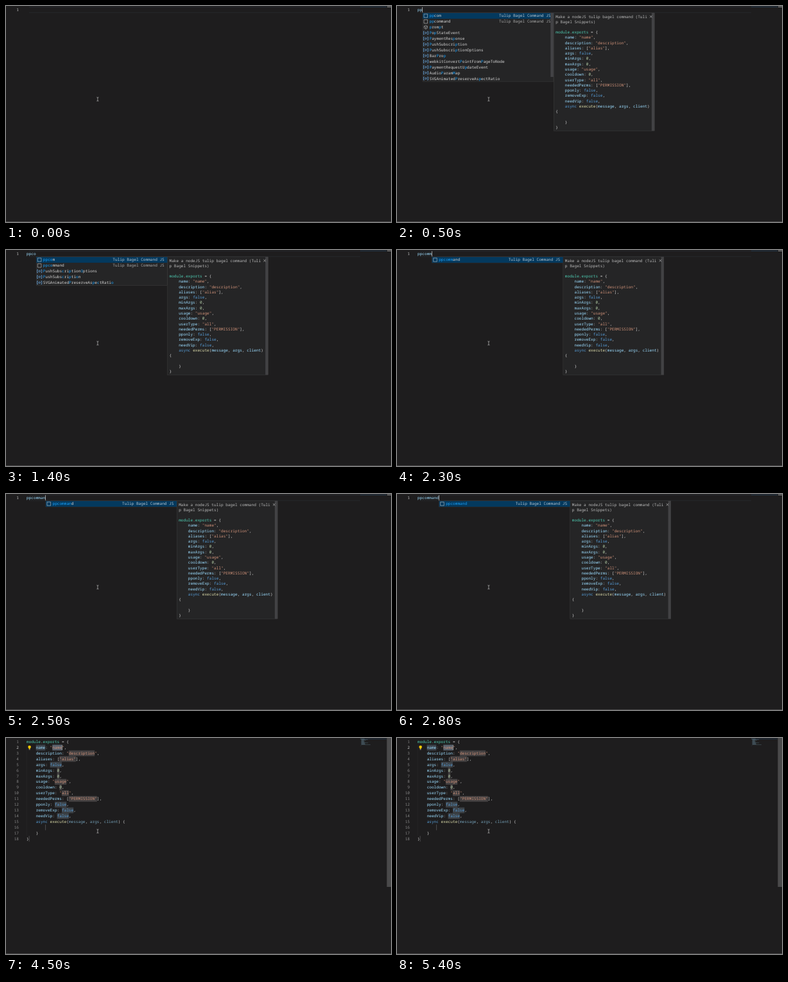
Recreate the animation shown at these times as an HTML page. Size 600 by 338 pixels, loop 5.6 s.

```html
<!DOCTYPE html>
<html lang="en">
<head>
<meta charset="utf-8">
<title>Snippet completion</title>
<style>
  html, body { margin: 0; width: 100%; height: 100%; overflow: hidden; background: #1e1d1e; }
  svg { display: block; width: 600px; height: 338px; }
  text {
    font: 6.1px "Noto Sans Mono", "DejaVu Sans Mono", monospace;
    white-space: pre;
    text-rendering: geometricPrecision;
  }
</style>
</head>
<body>
<svg id="stage" viewBox="0 0 600 338"></svg>
<script>
const LOOP = 5600, INSERT = 3200, BULB = 3400, DIM = 4200;
const CHAR = 3.66, LEFT = 32, LINE = 8.92, DOC_LINE = 8.28;
const stage = document.getElementById('stage');

// Start time of each typed prefix
const typing = [
  [0, ''], [200, 'p'], [400, 'pp'], [600, 'ppc'], [700, 'ppco'], [1900, 'ppcom'],
  [2100, 'ppcomm'], [2400, 'ppcomma'], [2500, 'ppcomman'], [2600, 'ppcommand']
];

// Angle brackets mark the tab stops
const snippet = `module.exports = {
    name: "<name>",
    description: "<description>",
    aliases: [<"alias">],
    args: <false>,
    minArgs: <0>,
    maxArgs: <0>,
    usage: "<usage>",
    cooldown: <0>,
    userType: "<all>",
    neededPerms: [<"PERMISSION">],
    pponly: <false>,
    removeExp: <false>,
    needVip: <false>,
    async execute(message, args, client) {
        <>
    }
}<>`;
const docLines = snippet.replace(/[<>]/g, '').replace(') {', ')\n{').split('\n');
const docIntro = ['Make a nodeJS tulip bagel command (Tuli', 'p Bagel Snippets)'];
const label = 'Tulip Bagel Command JS';

// Underscores toggle the matched letters
const broadMatches = [
  '_p_rom_p_t', '_P_o_p_StateEvent', '_P_aymentRes_p_onse', '_P_ushSubscri_p_tion',
  '_P_ushSubscri_p_tionOptions', 'Bar_P_ro_p_', 'webkitConvert_P_ointFrom_P_ageToNode',
  '_P_aymentRequestU_p_dateEvent', 'Audio_P_aram_M_ap', 'SVGAnimated_P_reserveAs_p_ectRatio'
];
const narrowMatches = [
  '_P_ushSubs_c_ri_p_tion_O_ptions', '_P_ushSubs_c_ri_p_ti_o_n', 'SVGAnimated_P_reserveAs_p_e_c_tRati_o_'
];

const esc = s => s.replace(/&/g, '&amp;').replace(/</g, '&lt;');
const rect = (x, y, w, h, fill, extra = '') =>
  `<rect x="${x}" y="${y}" width="${w}" height="${h}" fill="${fill}" ${extra}/>`;
const path = (d, stroke, width = .6, fill = 'none') =>
  `<path d="${d}" stroke="${stroke}" stroke-width="${width}" fill="${fill}"/>`;
const text = (x, y, s, fill, extra = '') =>
  `<text x="${x}" y="${y + 2}" fill="${fill}" ${extra}>${esc(s)}</text>`;
const lineY = n => 6 + n * LINE;

function tokenColor(token) {
  if (token[0] === '"') return '#ce9178';
  if (/^(async|false)$/.test(token)) return '#569cd6';
  if (/^(module|exports)$/.test(token)) return '#4ec9b0';
  if (token === 'execute') return '#dcdcaa';
  if (/^\d/.test(token)) return '#b5cea8';
  return /^\w/.test(token) ? '#9cdcfe' : '#d4d4d4';
}

function code(x, y, line, dim) {
  return [...line.matchAll(/"[^"]*"|\w+|[^\w\s"]+/g)].map(({0: token, index}) => {
    const faded = dim && /^(message|args|client)$/.test(token) && line.includes('execute');
    return text(x + index * CHAR, y, token, tokenColor(token), faded ? 'opacity=".67"' : '');
  }).join('');
}

function marked(x, y, source) {
  let col = 0;
  return source.split('_').map((part, i) => {
    const out = part && text(x + col * CHAR, y, part, i % 2 ? '#18a0fb' : '#d4d4d4');
    col += part.length;
    return out;
  }).join('');
}

function icon(x, y, kind) {
  if (kind === 'snippet')
    return path(`M${x + 2} ${y - 2.8}h5.6v5.6h-5.6z`, '#c5c5c5');
  if (kind === 'method')
    return path(`M${x + 4.8} ${y - 3}l2.6 1.4v3l-2.6 1.5l-2.6 -1.5v-3zm-2.6 1.5l2.6 1.4l2.6 -1.4m-2.6 1.4v2.9`, '#c5c5c5', .55);
  return path(`M${x + 2.6} ${y - 2.4}h-1.2v4.8h1.2M${x + 7.2} ${y - 2.4}h1.2v4.8h-1.2` +
    `M${x + 3.2} ${y}l1.7 -1.4l1.7 1.2l-1.7 1.6z`, '#75beff', .7);
}

function suggestions(typed, caretX) {
  const names = ['ppcom', 'ppcommand'].filter(name => name.startsWith(typed))
    .map(name => `_${typed}_${name.slice(typed.length)}`);
  const own = names.length;
  if (typed.length === 2) names.push(...broadMatches);
  else if (typed.length < 5) names.push(...narrowMatches);

  const x = caretX + .7, height = names.length * LINE + .3;
  let out = rect(x, 10.8, 204, height, '#252526', 'stroke="#454545" stroke-width=".4"');
  out += rect(x, 11, 204, LINE, '#04395e');
  if (names.length > 10) out += rect(x + 199.3, 11, 4.5, 100, '#434346');
  names.forEach((name, i) => {
    const y = 15.4 + i * LINE;
    const kind = i < own ? 'snippet' : name === '_p_rom_p_t' ? 'method' : 'variable';
    out += icon(x, y, kind) + marked(x + 10.5, y, name);
    if (i < own) out += text(x + 119, y, label, i ? '#a5a5a5' : '#b4c4d0');
  });
  return out;
}

function docPanel(x) {
  let out = rect(x, 10.8, 157, 184.6, '#252526', 'stroke="#454545" stroke-width=".4"');
  out += rect(x + 152.7, 11, 4.3, 184.2, '#424244');
  docIntro.forEach((line, i) => out += text(x + 3, 16.8 + i * DOC_LINE, line, '#b8b8b8'));
  docLines.forEach((line, i) => out += code(x + 3, 41 + i * DOC_LINE, line));
  return out + path(`M${x + 149.8} 14.8l3.6 3.6m0 -3.6l-3.6 3.6`, '#d0d0d0');
}

function typingView({typed, caret}) {
  const caretX = LEFT + typed.length * CHAR;
  let out = path('M36 1.7H552M36 10.3H552', '#2b3136', .6);
  out += rect(552, 1, 41, 1, '#24384a') + rect(594, .8, 6, 1.2, '#8a8a8a');
  out += text(20 - CHAR, 6, '1', '#c6c6c6') + text(LEFT, 6, typed, '#9cdcfe');
  if (caret) out += rect(caretX, 1.8, .7, 8.2, '#d0d0d0');
  if (typed.length > 1) out += docPanel(caretX + 204.9) + suggestions(typed, caretX);
  return out;
}

function minimap() {
  let out = rect(552, 1, 41, .8, '#24384a');
  snippet.replace(/[<>]/g, '').split('\n').forEach((line, i) => {
    const indent = line.search(/\S/);
    if (indent >= 0)
      out += rect(552 + indent * .4, 1 + i * .66, (line.length - indent) * .38, .45, '#6f93a5', 'opacity=".65"');
  });
  return out + rect(593.5, 0, 6.5, 233, '#4a4a4b');
}

function insertedView({caret, bulb, dim}) {
  let out = minimap() + path(`M32.6 ${lineY(1) - 4.4}V${lineY(17) - 4.4}`, '#2c2c2d', .5);
  out += rect(LEFT + 4 * CHAR, lineY(1) - 4.4, 4 * CHAR, LINE, '#3b434b');
  snippet.split('\n').forEach((raw, i) => {
    const y = lineY(i), number = String(i + 1), stop = raw.match(/<(.*)>/);
    out += text(20 - number.length * CHAR, y, number, i === 1 ? '#c6c6c6' : '#858585');
    if (stop) {
      const x = LEFT + stop.index * CHAR;
      const fill = i === 1 ? '#58626d' : /false/.test(stop[1]) ? '#3d4247' : '#444142';
      out += rect(x, y - 4.4, stop[1].length * CHAR || .8, LINE, stop[1] ? fill : '#58585a');
    }
    out += code(LEFT, y, raw.replace(/[<>]/g, ''), dim);
  });
  if (caret) out += rect(LEFT + 15 * CHAR, lineY(1) - 4.1, .7, 8.2, '#d0d0d0');
  if (bulb) {
    out += '<circle cx="36.6" cy="14" r="2.3" fill="#ffcc00"/>';
    out += rect(35.6, 15.8, 2, 1.5, '#ffcc00') + rect(35.7, 17.6, 1.8, .8, '#c5c5c5');
  }
  return out;
}

function stateAt(t) {
  const [since, typed] = typing.filter(([start]) => start <= t).pop();
  const inserted = t >= INSERT;
  const idle = t - (inserted ? INSERT : since);
  return {
    typed, inserted,
    caret: (inserted || typed !== '') && idle % 1000 < 500,
    bulb: t >= BULB,
    dim: t >= DIM
  };
}

const pointer = path('M141.4 142.8q1.5 0 1.5 .8q0 -.8 1.5 -.8m-1.5 .8v4.4m-1.5 .8q1.5 0 1.5 -.8q0 .8 1.5 .8', '#c8c8c8', .7);
let shown = '';

function draw(now) {
  const state = stateAt(now % LOOP), key = JSON.stringify(state);
  if (key !== shown) {
    shown = key;
    stage.innerHTML = rect(0, 0, 600, 338, '#1e1d1e') +
      (state.inserted ? insertedView(state) : typingView(state)) +
      pointer + rect(0, 337.3, 600, .7, '#5a5a5a');
  }
}

const start = performance.now();
function tick() {
  draw(performance.now() - start);
  requestAnimationFrame(tick);
}
tick();
</script>
</body>
</html>
```
